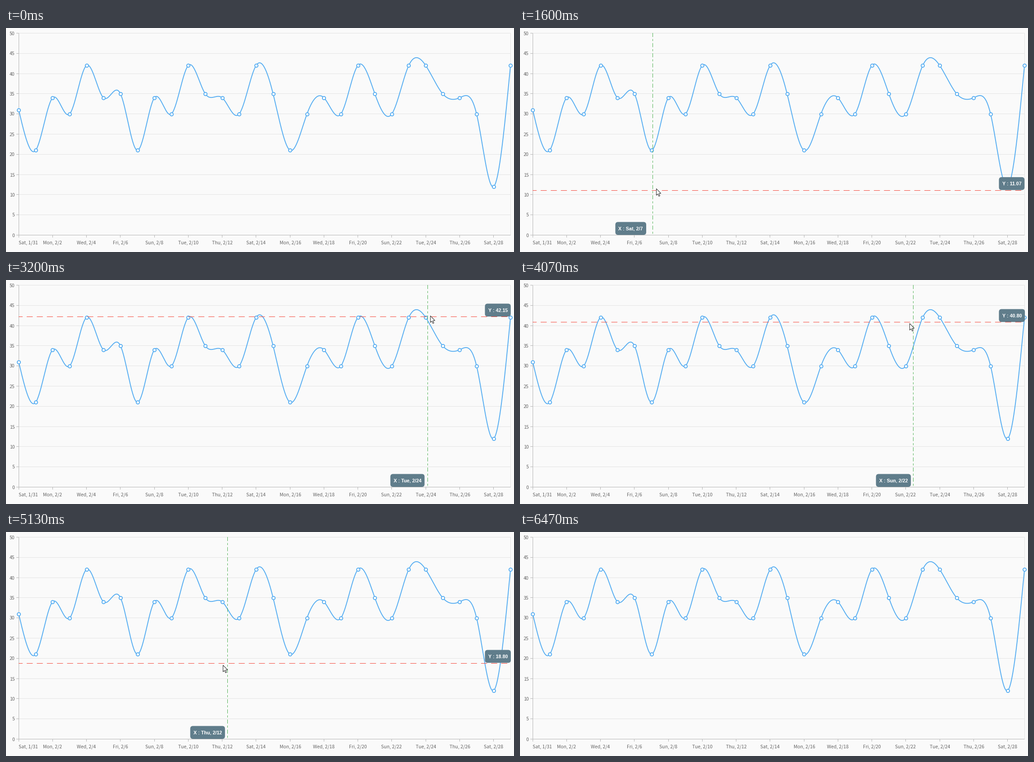
A matplotlib script that plays this animation: 1127x497 px, repeating every 6.67 s.

```python
import numpy as np
import matplotlib.pyplot as plt
from matplotlib.animation import FuncAnimation
from matplotlib.patches import FancyBboxPatch, Polygon

W, H, DPI = 1127, 497, 64
PT = 72 / DPI                      # points per pixel
FRAMES, INTERVAL = 230, 29
STEP = 66.7                        # each pose is held this long, in ms

LEFT, RIGHT, TOP, BOTTOM = 28.5, 1119.5, 11.5, 459.5
UNIT = (BOTTOM - TOP) / 50
DIP, WAVE = [21, 34], [30, 42, 35]
VALUES = np.array([31, *DIP, 30, 42, 34, 35, *DIP, *WAVE, 34, *WAVE,
                   21, 30, 34, *WAVE, 30, 42, 42, 35, 34, 30, 12, 42])
DAYS = len(VALUES)
DAY = (RIGHT - LEFT) / (DAYS - 1)

BACK, GRID, AXIS, INK = "#fafafa", "#e3e3e3", "#b4b4b4", "#666666"
BLUE, SLATE, RED, GREEN = "#55adf2", "#607d8b", "#f44336", "#4caf50"

# The crosshair sweeps to the far corner, rests there and returns.
START, END, LEAD = 8, 96, 0.42
CORNER = (963, 70)
ROUTE = [(START, (55, 492)), (24, (294.3, 360.3)), (34, (569.5, 266.8)),
         (48, (935.5, 81.85)), (51, CORNER), (54.5, CORNER),
         (61, (872.5, 93.95)), (77, (491.5, 291.05)), (END + 1, (56, 496))]
WHEN = np.array([step for step, _ in ROUTE], float)
WHERE = np.array([point for _, point in ROUTE], float)


def hermite(u, h, y0, y1, m0, m1):
    return ((1 + 2 * u) * (1 - u) ** 2 * y0 + u * (1 - u) ** 2 * h * m0
            + u * u * (3 - 2 * u) * y1 + u * u * (u - 1) * h * m1)


def route_slopes():
    """Harmonic means of neighbouring speeds, so the motion never overshoots."""
    sec = np.diff(WHERE, axis=0) / np.diff(WHEN)[:, None]
    a, b = sec[:-1], sec[1:]
    same = a * b > 0
    mid = np.where(same, 2 * a * b / np.where(same, a + b, 1), 0)
    return np.vstack([sec[:1], mid, sec[-1:]])


SPEED = route_slopes()


def position(step):
    i = np.searchsorted(WHEN, step, side="right") - 1
    i = min(max(i, 0), len(WHEN) - 2)
    h = WHEN[i + 1] - WHEN[i]
    return hermite((step - WHEN[i]) / h, h, WHERE[i], WHERE[i + 1],
                   SPEED[i], SPEED[i + 1])


def natural_spline(y, per=32):
    n = len(y)
    a = np.diag([2.0] + [4.0] * (n - 2) + [2.0])
    a += np.diag(np.ones(n - 1), 1) + np.diag(np.ones(n - 1), -1)
    rhs = 3 * np.concatenate([[y[1] - y[0]], y[2:] - y[:-2], [y[-1] - y[-2]]])
    d = np.linalg.solve(a, rhs)
    t = np.linspace(0, n - 1, per * (n - 1) + 1)
    i = np.minimum(t.astype(int), n - 2)
    return t, hermite(t - i, 1, y[i], y[i + 1], d[i], d[i + 1])


def day_name(d):
    week = ("Sat", "Sun", "Mon", "Tue", "Wed", "Thu", "Fri")
    date = "1/31" if d == 0 else "3/1" if d == 29 else f"2/{d}"
    return f"{week[d % 7]}, {date}"


def x_of(day):
    return LEFT - 0.3 + day * DAY


def y_of(value):
    return BOTTOM - value * UNIT


def pixel(v):
    return np.floor(v) + 0.5


fig = plt.figure(figsize=(W / DPI, H / DPI), dpi=DPI, facecolor=BACK)
ax = fig.add_axes([0, 0, 1, 1])
ax.set_xlim(0, W)
ax.set_ylim(H, 0)
ax.axis("off")


def line(x0, y0, x1, y1, color, z=1, **kw):
    return ax.plot([x0, x1], [y0, y1], color=color, lw=PT, zorder=z,
                   snap=False, solid_capstyle="butt", **kw)[0]


def label(x, y, text, ha):
    ax.text(x, y, text, ha=ha, va="baseline", color=INK,
            family="Noto Sans CJK JP", size=10.4 * PT)


def draw_axes():
    for value in range(0, 51, 5):
        y = pixel(y_of(value))
        line(LEFT, y, RIGHT, y, GRID)
        line(23, y, 28, y, AXIS, 2)
        label(19.5, y + 4, str(value), "right")
    line(RIGHT, TOP, RIGHT, BOTTOM, GRID)
    line(LEFT, TOP, LEFT, BOTTOM + 0.5, AXIS, 2)
    line(LEFT, BOTTOM, RIGHT, BOTTOM, AXIS, 2)
    for d in range(0, DAYS, 2):
        x = pixel(x_of(d))
        line(x, 460, x, 465, AXIS, 2)
        if d:
            label(x, 479, day_name(d), "center")
        else:
            label(28, 479, day_name(d), "left")


def draw_series():
    t, v = natural_spline(VALUES)
    ax.plot(x_of(t), y_of(v), color=BLUE, lw=1.9 * PT, zorder=3)
    ax.plot(x_of(np.arange(DAYS)), y_of(VALUES), "o", ms=7.2 * PT, mfc="white",
            mec=BLUE, mew=1.8 * PT, zorder=4, snap=False)


class Tip:
    HEIGHT = 28.6

    def __init__(self):
        self.box = ax.add_patch(FancyBboxPatch(
            (0, 0), 57, self.HEIGHT, fc=SLATE, ec="none", zorder=6,
            boxstyle="round,pad=0,rounding_size=6"))
        self.text = ax.text(0, 0, "", color="white", family="Liberation Sans",
                            weight="bold", size=10.8 * PT, zorder=7)

    def place(self, x, bottom, text):
        self.text.set_text(text)
        self.text.set_position((x + 7, bottom - 10.5))
        width = self.text.get_window_extent().width
        self.box.set_bounds(x, bottom - self.HEIGHT, width + 14, self.HEIGHT)


draw_axes()
draw_series()
hline = line(LEFT - 0.5, 0, RIGHT, 0, RED, 5, ls=(4.5, (13.4, 9)))
vline = line(0, TOP - 0.5, 0, BOTTOM, GREEN, 5, ls=(0, (9, 4.5, 4.5, 4.5)))
x_tip, y_tip = Tip(), Tip()
cross = (hline, vline, x_tip.box, x_tip.text, y_tip.box, y_tip.text)

ARROW = np.array([(0.5, 0.5), (0.5, 15.2), (3.8, 12.2), (6.1, 17.4),
                  (8.3, 16.4), (6.1, 11.3), (10.6, 11)])
pointer = ax.add_patch(Polygon(ARROW, fc="white", ec="#222222", lw=PT, zorder=8))


def show(artists, on):
    for artist in artists:
        artist.set_visible(on)


def update(i):
    step = int(((i + 1) * INTERVAL + 7) / STEP)
    moving = START <= step <= END
    cx, cy = position(step)
    crossed = moving and cy <= BOTTOM

    show([pointer], moving)
    show(cross, crossed)
    pointer.set_xy(ARROW + np.floor(position(step + LEAD)))
    if crossed:
        hline.set_ydata([pixel(cy)] * 2)
        vline.set_xdata([pixel(cx)] * 2)
        day = int((cx - LEFT) / DAY)
        x_tip.place(max(LEFT, cx - 82.8), 459, f"X : {day_name(day)}")
        y_tip.place(1062.5, cy - 0.8, f"Y : {(BOTTOM - cy) / UNIT:.2f}")
    return [pointer, *cross]


anim = FuncAnimation(fig, update, frames=FRAMES, interval=INTERVAL,
                     repeat=True, repeat_delay=0, blit=False)
plt.show()
```
